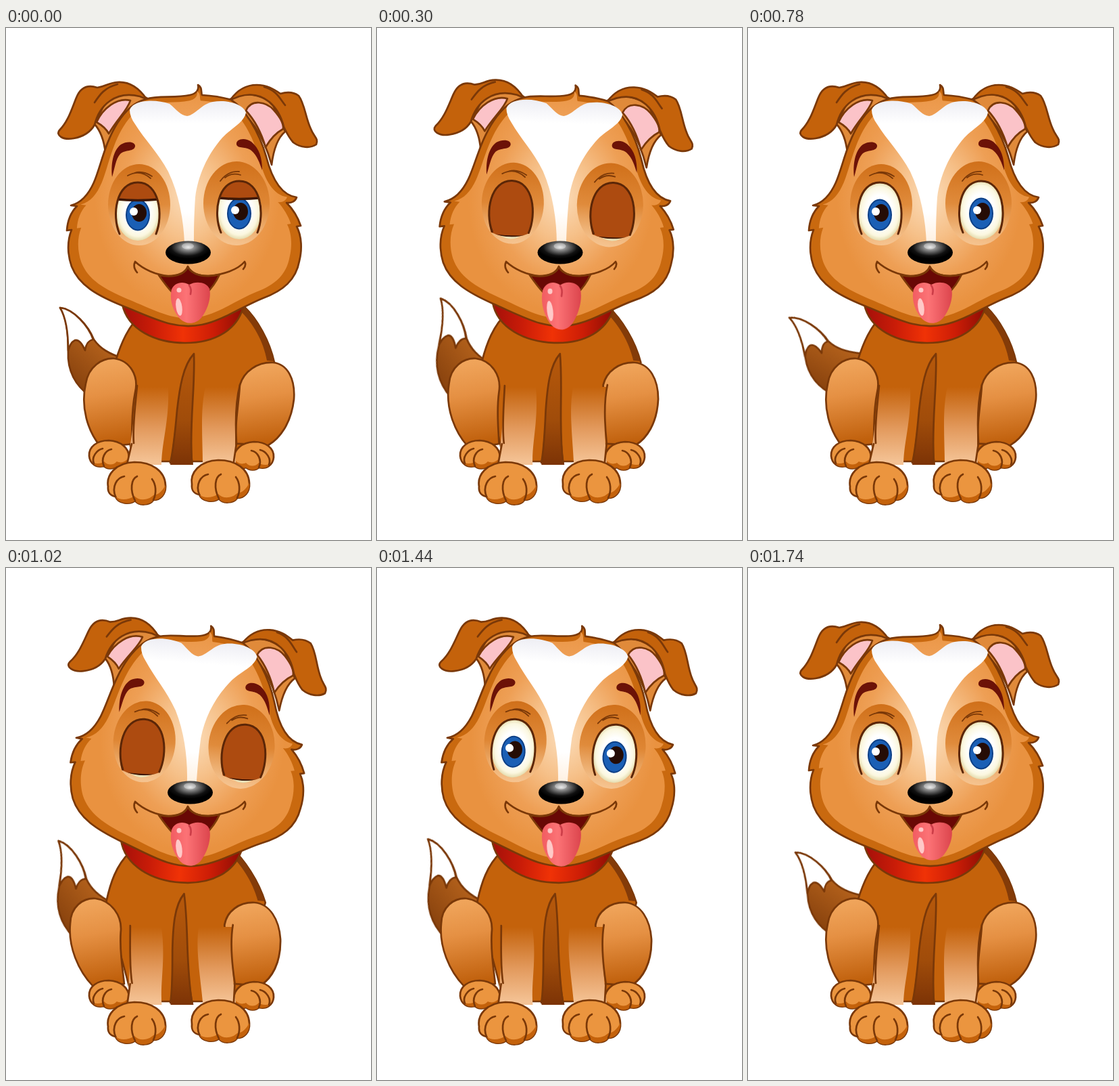
Animation, 540 px wide and 756 px high, one loop 1.8 s. Source, as an HTML page:

```html
<!DOCTYPE html>
<html lang="en">
<head>
<meta charset="utf-8">
<title>Swaying puppy</title>
<style>
@property --lean { syntax: "<number>"; inherits: true; initial-value: 0; }
@property --lid { syntax: "<number>"; inherits: true; initial-value: 0; }

html, body { margin: 0; width: 100%; height: 100%; overflow: hidden; background: #fff; }
svg { display: block; width: 100%; height: 100%; animation: sway .9s infinite, blink .9s infinite; }

.line { fill: none; }
.line, .ink { stroke: #7a3808; stroke-width: 2.7; stroke-linejoin: round; stroke-linecap: round; }
.fur { fill: #eb953f; }
.dark { fill: #c4620b; }
.brow { fill: #6c1207; }

#head { transform-origin: 270px 375px; transform: rotate(calc(var(--lean) * 3.8deg)); }
#trunk { transform-origin: 270px 640px; transform: skewX(calc(var(--lean) * 5.2deg)); }
#thighs { transform-origin: 270px 630px; transform: translateX(calc(var(--lean) * -9px)) skewX(calc(var(--lean) * 7.6deg)); }
#rump { transform: translateX(calc(var(--lean) * -21px)); }
#nose { transform: translateX(calc(var(--lean) * 3px)); }
#tail { transform-origin: 125px 520px; animation: wag .9s infinite; }
#tongue { transform-origin: 271px 376px; animation: pant .9s infinite; }
.lid { transform: translateY(calc(var(--lid) * 1px)); }

/* one cycle is fifteen held poses of 60 ms */
@keyframes sway {
  0% { --lean: 0; animation-timing-function: steps(3); }
  20% { --lean: 1.5; animation-timing-function: steps(3); }
  40% { --lean: 0; animation-timing-function: steps(1); }
  46.6667% { --lean: 0; animation-timing-function: steps(3); }
  66.6667% { --lean: 1.5; animation-timing-function: steps(3); }
  86.6667%, 100% { --lean: 0; }
}
@keyframes wag {
  0% { transform: rotate(0deg) scaleY(1); animation-timing-function: steps(3); }
  20% { transform: rotate(14deg) scaleY(1.06); animation-timing-function: steps(6); }
  60% { transform: rotate(8deg) scaleY(1.07); animation-timing-function: steps(1); }
  66.6667% { transform: rotate(8deg) scaleY(1.06); animation-timing-function: steps(3); }
  86.6667% { transform: rotate(-11deg) scaleY(.96); animation-timing-function: steps(2); }
  100% { transform: rotate(0deg) scaleY(1); }
}
@keyframes pant {
  0% { transform: scaleY(1); animation-timing-function: steps(5); }
  33.3333% { transform: scaleY(1.16); animation-timing-function: steps(8); }
  86.6667% { transform: scaleY(1); animation-timing-function: steps(1); }
  93.3333% { transform: scaleY(.93); animation-timing-function: steps(1); }
  100% { transform: scaleY(1); }
}
@keyframes blink {
  0% { --lid: 0; animation-timing-function: steps(2); }
  13.3333% { --lid: 56; animation-timing-function: steps(1); }
  33.3333% { --lid: 56; animation-timing-function: steps(2); }
  46.6667% { --lid: 0; animation-timing-function: steps(1); }
  53.3333% { --lid: -45; animation-timing-function: steps(1); }
  100% { --lid: -45; }
}
</style>
</head>
<body>
<svg viewBox="0 0 540 756">
  <defs>
    <linearGradient id="thighFill" x1="0" y1="0" x2=".1" y2="1">
      <stop offset="0" stop-color="#f2a960"/><stop offset=".45" stop-color="#e59043"/><stop offset="1" stop-color="#c0600c"/>
    </linearGradient>
    <linearGradient id="legFill" gradientUnits="userSpaceOnUse" x1="0" y1="530" x2="0" y2="640">
      <stop offset="0" stop-color="#c4620b"/><stop offset=".55" stop-color="#e2995c"/><stop offset="1" stop-color="#f4c294"/>
    </linearGradient>
    <linearGradient id="bellyFill" x1="0" y1="0" x2="0" y2="1">
      <stop offset="0" stop-color="#b7590b"/><stop offset=".6" stop-color="#a04c0a"/><stop offset="1" stop-color="#7c3306"/>
    </linearGradient>
    <linearGradient id="tailFill" x1=".8" y1="0" x2=".2" y2="1">
      <stop offset="0" stop-color="#cf7524"/><stop offset="1" stop-color="#7d3a0a"/>
    </linearGradient>
    <linearGradient id="collarFill">
      <stop offset="0" stop-color="#a3100a"/><stop offset=".25" stop-color="#c91c08"/><stop offset=".5" stop-color="#f03206"/>
      <stop offset=".75" stop-color="#cc1d06"/><stop offset="1" stop-color="#8c0d05"/>
    </linearGradient>
    <radialGradient id="faceFill" gradientUnits="userSpaceOnUse" cx="0" cy="0" r="150" gradientTransform="translate(268 250) scale(1 1.2)">
      <stop offset="0" stop-color="#fbdcb9"/><stop offset=".35" stop-color="#f6c18a"/><stop offset=".7" stop-color="#ee9f55"/><stop offset="1" stop-color="#e99240"/>
    </radialGradient>
    <linearGradient id="socketFill" x1="0" y1="0" x2="0" y2="1">
      <stop offset="0" stop-color="#d0701a"/><stop offset=".5" stop-color="#dd8431" stop-opacity=".9"/><stop offset="1" stop-color="#f8cfa2" stop-opacity=".75"/>
    </linearGradient>
    <linearGradient id="blazeFill" x1="0" y1="0" x2="0" y2="1">
      <stop offset="0" stop-color="#eeeef4"/><stop offset=".16" stop-color="#fff"/><stop offset=".78" stop-color="#fff"/><stop offset="1" stop-color="#fff0df"/>
    </linearGradient>
    <radialGradient id="eyeFill">
      <stop offset=".55" stop-color="#fff"/><stop offset=".85" stop-color="#fbf7df"/><stop offset="1" stop-color="#e5dcae"/>
    </radialGradient>
    <radialGradient id="noseFill" cy=".27" r=".5">
      <stop offset="0" stop-color="#ddd"/><stop offset=".28" stop-color="#888"/><stop offset=".75" stop-color="#111"/><stop offset="1" stop-color="#000"/>
    </radialGradient>
    <linearGradient id="tongueFill">
      <stop offset="0" stop-color="#f25d62"/><stop offset=".4" stop-color="#fc7376"/><stop offset="1" stop-color="#dc454d"/>
    </linearGradient>

    <path id="skull" d="M207 105C225 99 250 104 272 99C281 97 286 92 284 84C291 88 288 94 290 99C306 100 320 102 333 106C353 119 374 152 385 190C394 225 408 247 430 250C428 256 422 259 415 258C424 267 432 280 436 292L430 293C438 308 438 328 434 344C429 372 410 388 380 399C350 411 320 432 290 438C250 446 222 430 172 410C135 395 108 380 97 352C91 335 90 315 97 298L90 299C91 285 96 272 105 263L96 262C112 258 122 246 130 228C140 205 146 170 165 140C178 120 190 110 207 105Z"/>
    <clipPath id="skullClip"><use href="#skull"/></clipPath>
    <clipPath id="lidClip"><path d="M-33 2C-33 -24 -19 -43 0 -43S33 -24 33 2C33 17 30 28 27 34Q0 46 -29 34C-32 24 -33 14 -33 2Z"/></clipPath>

    <g id="eye">
      <ellipse rx="33" ry="43" fill="url(#eyeFill)"/>
      <ellipse cy="5" rx="18" ry="23.5" fill="#0d3f86"/>
      <ellipse cy="5" rx="16" ry="21.5" fill="#1b5fb5"/>
      <ellipse cx="2" cy="2" rx="11" ry="13" fill="#250c05"/>
      <circle cx="-6" r="6" fill="#fff"/>
      <g clip-path="url(#lidClip)">
        <g class="lid">
          <rect x="-40" y="-125" width="80" height="108" fill="#ad4b10"/>
          <path class="line" d="M-40 -19Q0 -14 40 -19" style="stroke:#3e1705;stroke-width:3.5"/>
        </g>
      </g>
      <path class="line" d="M-27 33C-39 5 -32 -43 0 -43S38 5 27 33" style="stroke:#5b2607;stroke-width:3"/>
    </g>
    <g id="paw">
      <path class="ink fur" d="M-42 5C-45 -12 -31 -30 -3 -31C23 -31 42 -18 43 3C44 17 35 25 25 25C20 33 3 34 -2 26C-9 32 -27 31 -31 20C-38 19 -43 14 -42 5Z"/>
      <path class="dark" d="M43 3C44 17 35 25 25 25C20 33 3 34 -2 26C-9 32 -27 31 -31 20C-24 26 -12 25 -3 19C4 27 18 25 25 18C34 17 39 10 43 3Z"/>
      <path class="line" d="M-31 20C-37 5 -29 -8 -18 -10M-2 26C-10 10 -8 -6 1 -10M25 25C30 14 29 2 23 -6"/>
    </g>
    <g id="backPaw">
      <path class="ink fur" d="M-29 3C-30 -11 -17 -20 0 -20C18 -19 30 -9 30 5C29 18 20 21 12 18C6 23 -3 22 -7 18C-19 21 -28 14 -29 3Z"/>
      <path class="dark" d="M30 5C29 18 20 21 12 18C6 23 -3 22 -7 18C-15 20 -21 17 -24 13C-15 15 -11 14 -7 11C-2 17 7 17 12 11C20 15 26 10 30 5Z"/>
      <path class="line" d="M-22 14C-26 5 -18 -6 -9 -8M-7 18C-12 7 -6 -5 4 -7"/>
    </g>
  </defs>

  <g id="rump">
    <g id="tail">
      <path class="ink" fill="url(#tailFill)" d="M80 413C100 415 122 440 130 460C139 473 152 481 174 488L134 550C108 535 94 514 92 488C92 460 92 430 80 413Z"/>
      <path class="ink" fill="#fff" d="M80 413C100 415 122 440 129 460C122 461 118 468 117 476C111 462 106 460 102 461C96 464 94 470 92 476C92 455 90 430 80 413Z"/>
    </g>
  </g>

  <g id="trunk">
    <path class="ink dark" d="M203 420C181 439 170 466 162 492L188 640H341L397 494C390 462 372 430 352 411Z"/>
    <path fill="#843b08" d="M346 417C366 436 381 463 386 491L396 492C389 462 372 430 352 411Z"/>
    <path fill="url(#bellyFill)" d="M278 481C262 498 257 530 253 565L243 645H277C271 590 280 540 278 481Z"/>
  </g>

  <g id="thighs">
    <path class="ink" fill="url(#thighFill)" d="M118 525C122 500 142 487 160 488C183 491 197 513 191 538C185 568 187 590 186 614C170 617 150 617 139 617C121 595 110 560 118 525Z"/>
    <path class="ink" fill="url(#thighFill)" d="M346 527C352 507 372 493 395 494C417 496 428 519 426 548C422 584 405 606 388 616C373 617 350 613 340 614C338 585 344 560 346 527Z"/>
  </g>
  <use href="#backPaw" x="152" y="629"/>
  <use href="#backPaw" transform="translate(367 631) scale(-1 1)"/>

  <g style="transform-origin:270px 640px;transform:skewX(calc(var(--lean) * 5.2deg))">
    <path fill="url(#legFill)" d="M193 530C191 565 186 605 179 645H230C230 612 242 580 240 530Z"/>
    <path fill="url(#legFill)" d="M295 530C287 565 291 605 291 645H340C338 610 339 565 345 530Z"/>
    <path class="line" d="M194 528C191 560 187 590 189 613M186 614L179 644M278 481C262 498 257 530 253 565C250 598 248 622 243 642M278 481C280 535 271 580 275 642M346 527C340 550 339 580 341 613L337 640"/>
  </g>
  <use href="#paw" x="193" y="672"/>
  <use href="#paw" transform="translate(317 669)"/>

  <g id="head">
    <path class="ink" fill="url(#collarFill)" d="M172 408C180 446 222 465 265 465C310 465 344 445 352 408Z"/>

    <path class="ink" fill="#e08a3a" d="M213 106C190 92 160 97 146 112L131 142C140 152 145 166 147 184C160 155 180 125 213 106Z"/>
    <path fill="#fbc3c8" class="ink" d="M134 139C143 119 164 102 184 107C180 121 164 135 152 156C148 148 141 143 134 139Z"/>
    <path class="ink dark" d="M208 105C195 86 180 79 165 80C150 81 147 87 135 88C120 83 110 88 104 103C97 120 92 138 79 151C73 158 84 166 100 163C116 160 126 152 131 143C138 114 162 92 198 101Z"/>
    <path class="line" d="M165 83C146 88 139 98 131 110"/>

    <path class="ink" fill="#e08a3a" d="M330 106C352 92 377 98 394 112L413 153C402 162 396 178 393 202C380 155 360 130 330 106Z"/>
    <path fill="#fbc3c8" class="ink" d="M355 122C363 104 385 109 396 121C405 131 411 141 410 149C399 155 391 164 384 176C377 152 367 135 355 122Z"/>
    <path class="ink dark" d="M332 106C344 89 358 84 371 84C386 84 396 90 406 97C416 94 426 95 433 100C442 112 443 132 451 149C455 160 463 163 459 172C450 178 436 177 425 169C417 160 414 152 411 146C404 118 382 90 345 101Z"/>
    <path class="line" d="M382 87C400 92 405 104 413 114"/>

    <use href="#skull" class="ink" fill="#c9690f"/>
    <g clip-path="url(#skullClip)">
      <use href="#skull" fill="url(#faceFill)" transform="translate(22.500 14) scale(.915 .942)"/>
      <ellipse cx="197" cy="261" rx="46" ry="60" fill="url(#socketFill)"/>
      <ellipse cx="341" cy="259" rx="49" ry="62" fill="url(#socketFill)"/>
    </g>
    <path fill="url(#blazeFill)" d="M183 121C188 106 220 104 242 112C253 121 258 129 268 130C281 128 289 112 306 109C328 105 352 113 355 125C352 140 333 148 320 162C298 187 284 218 280 250C278 280 278 300 278 318H264C263 285 256 245 240 212C225 184 206 166 191 142Q183 131 183 121Z"/>

    <path class="brow" d="M157 220C155 202 158 181 170 172C180 166 192 168 191 175C189 183 177 179 169 186C162 194 161 207 157 220Z"/>
    <path class="brow" d="M379 210C379 192 375 178 363 168C353 161 340 164 341 172C343 179 355 174 363 181C372 189 375 199 379 210Z"/>
    <path class="line" d="M180 218Q198 208 214 222M190 214Q202 210 216 219M317 226Q328 211 345 212M324 221Q334 213 347 217" style="stroke-width:1.8"/>
    <use href="#eye" x="195" y="271"/>
    <use href="#eye" x="345" y="269"/>
  </g>

  <path fill="#690805" class="ink" d="M226 365C247 369 264 365 269 353C275 365 294 369 316 364C306 385 292 400 271 405C251 400 240 385 226 365Z"/>
  <path class="line" d="M194 361C189 355 189 349 191 345C203 356 222 365 240 366C254 366 265 362 269 352C274 362 286 366 300 366C322 364 343 357 353 345Q356 350 351 356"/>
  <g id="tongue">
    <path fill="url(#tongueFill)" d="M245 386C241 402 248 420 258 430C267 438 280 438 289 428C299 415 304 397 301 385C297 375 281 373 271 379C261 373 249 376 245 386Z"/>
    <path class="line" d="M271 380Q275 385 273 393" style="stroke:#cc3d48"/>
    <ellipse cx="256" cy="412" rx="4.500" ry="13" transform="rotate(-8 256 412)" fill="#ffc9c8"/>
    <circle cx="256" cy="387" r="3.500" fill="#ffc9c8"/>
  </g>

  <g id="nose">
    <ellipse cx="269.500" cy="331.500" rx="33.500" ry="17" fill="url(#noseFill)"/>
    <ellipse cx="269" cy="322" rx="9" ry="4.500" fill="#fff" opacity=".35"/>
  </g>
</svg>
</body>
</html>
```
